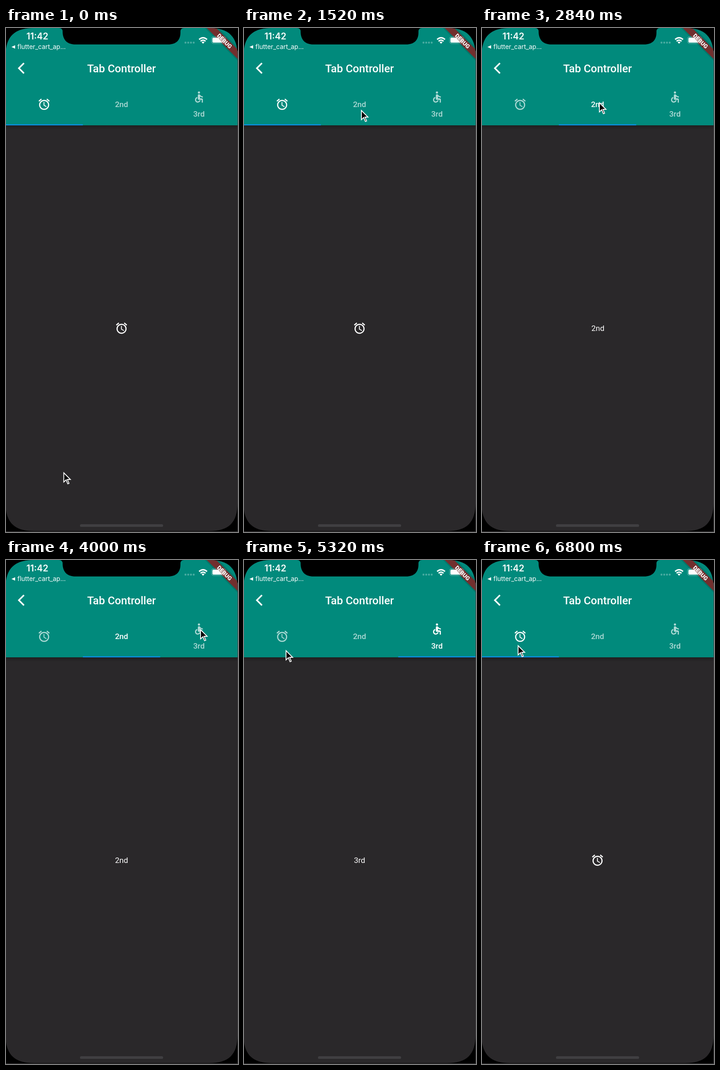
Write an HTML page that moves like this. It is 508x1103 px and loops after 6920 ms.

```html
<!DOCTYPE html>
<html lang="en">
<head>
<meta charset="utf-8">
<title>Tab Controller</title>
<style>
  html, body { margin: 0; width: 100%; height: 100%; overflow: hidden; background: #000; }
  svg { display: block; width: 100vw; height: 100vh; }
  text { fill: #fff; font-family: Roboto, sans-serif; }
  .mid { text-anchor: middle; }
  .label { font-size: 17px; }
  .tab { font-weight: 450; }
  .status { font-family: Inter, sans-serif; }
</style>
</head>
<body>
<svg viewBox="0 0 508 1103">
  <defs>
    <clipPath id="screen">
      <path d="M-1 62C-1 19 18 0 61 0H445C488 0 507 19 507 62V1039C507 1082 488 1101 445 1101H61C18 1101-1 1082-1 1039Z"/>
    </clipPath>
    <linearGradient id="shade" x2="0" y2="1">
      <stop offset="0" stop-color="#000" stop-opacity=".24"/>
      <stop offset="1" stop-color="#000" stop-opacity="0"/>
    </linearGradient>
    <g id="alarm" fill="#fff" transform="scale(1.227) translate(-12 -12)">
      <path d="M22 5.72l-4.6-3.86-1.29 1.53 4.6 3.86zM7.88 3.39L6.6 1.86 2 5.71l1.29 1.53zM12.5 8H11v6l4.75 2.85.75-1.23-4-2.37z"/>
      <circle cx="12" cy="13" r="8" fill="none" stroke="#fff" stroke-width="2"/>
    </g>
    <g id="chair" fill="#fff" transform="scale(1.227) translate(-12 -12)">
      <circle cx="12" cy="4" r="2"/>
      <path d="M19 13v-2c-1.54.02-3.09-.75-4.07-1.83l-1.29-1.43c-.5-.5-1.1-.77-1.83-.72C10.76 7.11 10 8.04 10 9.09V15c0 1.1.9 2 2 2h5v5h2v-5.5c0-1.1-.9-2-2-2h-3v-3.45c1.29 1.07 3.25 1.94 5 1.95zM12.83 18c-.41 1.16-1.52 2-2.83 2-1.66 0-3-1.34-3-3 0-1.31.84-2.41 2-2.83V12.1c-2.28.46-4 2.48-4 4.9 0 2.76 2.24 5 5 5 2.42 0 4.44-1.72 4.9-4z"/>
    </g>
  </defs>

  <rect width="508" height="1103"/>
  <g clip-path="url(#screen)">
    <rect x="-1" width="508" height="1101" fill="#2a282a"/>
    <g class="page"><use href="#alarm" x="253" y="657"/></g>
    <g class="page"><text class="mid label" x="253" y="663">2nd</text></g>
    <g class="page"><text class="mid label" x="253" y="663">3rd</text></g>

    <rect y="213" width="508" height="10" fill="url(#shade)"/>
    <rect x="-1" width="508" height="213" fill="#018a7c"/>
    <path transform="translate(26 73.3) scale(1.227)" fill="#fff" stroke="#fff" stroke-width=".4" d="M11.67 3.87L9.9 2.1 0 12l9.9 9.9 1.77-1.77L3.54 12z"/>
    <text class="mid" x="253" y="96.5" font-size="23.9" font-weight="500">Tab Controller</text>

    <g class="tabItem"><use href="#alarm" x="83.5" y="167"/></g>
    <g class="tabItem"><text class="mid label tab" x="253" y="172.7">2nd</text></g>
    <g class="tabItem">
      <use href="#chair" x="422.5" y="151"/>
      <text class="mid label tab" x="422.5" y="193.5">3rd</text>
    </g>
    <rect id="bar" y="210.7" width="169.3" height="2.4" fill="#0892e6"/>

    <path d="M116 0Q124 0 124 8V10C125 27 135 36 152 36H355C372 36 382 27 382 10V8Q382 0 390 0Z"/>
    <text class="status mid" x="68.7" y="25.2" font-size="19.5" font-weight="600">11:42</text>
    <path d="M12 41.5L20 37.7V45.3Z" fill="#fff"/>
    <text class="status" x="25" y="46" font-size="13.9">flutter_cart_ap...</text>
    <g fill="#fff" opacity=".28">
      <circle cx="393" cy="32" r="2.2"/><circle cx="399" cy="32" r="2.2"/>
      <circle cx="405" cy="32" r="2.2"/><circle cx="411" cy="32" r="2.2"/>
    </g>
    <g fill="none" stroke="#fff" stroke-width="3">
      <path d="M422.8 25.2Q431.5 17.2 440.2 25.2M426 29Q431.5 24 437 29"/>
      <path d="M428.3 31Q431.5 28.4 434.7 31L431.5 34.4Z" fill="#fff" stroke="none"/>
    </g>

    <g transform="translate(508 -1) rotate(45)">
      <rect x="-60" y="31" width="120" height="21" fill="#000" opacity=".14"/>
      <rect x="-60" y="34.4" width="120" height="14.7" fill="#722f2e"/>
    </g>
    <rect x="450" y="19" width="31" height="15" rx="4.5" fill="none" stroke="#fff" stroke-opacity=".45"/>
    <rect x="452" y="21" width="27" height="11" rx="2.8" fill="#fff"/>
    <text class="mid" transform="translate(508 -1) rotate(45)" y="46.2" font-size="12.5" font-weight="900" stroke="#722f2e" stroke-width="1.2" paint-order="stroke">DEBUG</text>

    <rect x="162" y="1086" width="182" height="5.8" rx="2.9" fill="#403f42"/>
  </g>
  <path d="M507.5 50V1102.5H0" fill="none" stroke="#444345"/>
  <path id="cursor" d="M1 2.4V21.5L5.8 17 9.3 25.4 11.9 24.3 8.5 16.2H14.8Z" stroke="#fff" stroke-width="1.7"/>
</svg>
<script>
const LOOP = 6920, STEP = 40, WIDTH = 508, TAB = WIDTH / 3;
const DURATION = 300, PAGE_LAG = 80;

// Tab changes: start time, tab left, tab entered
const changes = [[2475, 0, 1], [4080, 1, 2], [5520, 2, 0]];

// Pointer: time, x, y
const pointer = [
  [0, 125.5, 971], [120, 157, 937], [360, 157, 937], [460, 168, 780],
  [600, 125, 363], [720, 125, 363], [1440, 254, 171], [1480, 254, 171],
  [1520, 256, 178], [1640, 256, 178], [1760, 256, 161], [2960, 256, 161],
  [3680, 398, 158], [4000, 425, 150], [4400, 425, 150], [5120, 104, 192],
  [5320, 91, 196], [5480, 78, 185], [LOOP, 78, 185]
];

const pages = document.querySelectorAll('.page');
const tabs = document.querySelectorAll('.tabItem');
const bar = document.getElementById('bar');
const cursor = document.getElementById('cursor');

const clamp = v => Math.min(1, Math.max(0, v));
const mix = (a, b, k) => a + (b - a) * k;
const smooth = k => k * k * (3 - 2 * k);
const bezier = (a, b, s) => 3 * a * s * (1 - s) ** 2 + 3 * b * s * s * (1 - s) + s ** 3;

// cubic-bezier(.25, .1, .25, 1)
function ease(x) {
  x = clamp(x);
  if (x === 0 || x === 1) return x;
  let lo = 0, hi = 1;
  for (let i = 0; i < 24; i++) {
    const s = (lo + hi) / 2;
    if (bezier(.25, .25, s) < x) lo = s; else hi = s;
  }
  return bezier(.1, 1, lo);
}

function pointerAt(t) {
  const i = Math.max(1, pointer.findIndex(p => p[0] > t));
  const [t0, x0, y0] = pointer[i - 1], [t1, x1, y1] = pointer[i];
  const k = smooth(clamp((t - t0) / (t1 - t0)));
  return [mix(x0, x1, k), mix(y0, y1, k)];
}

function draw(t) {
  const [start, from, to] = changes.findLast(c => c[0] <= t) || changes[0];
  const barPos = ease((t - start) / DURATION);
  const pagePos = ease((t - start - PAGE_LAG) / DURATION);
  const dir = Math.sign(to - from);

  bar.setAttribute('x', -1 + TAB * mix(from, to, barPos));
  tabs.forEach((tab, i) => {
    const active = i === from ? 1 - barPos : i === to ? barPos : 0;
    tab.setAttribute('opacity', mix(.68, 1, active));
  });
  pages.forEach((page, i) => {
    const x = i === from ? -dir * pagePos : i === to ? dir * (1 - pagePos) : 2;
    page.setAttribute('transform', `translate(${x * WIDTH} 0)`);
  });
  cursor.setAttribute('transform', `translate(${pointerAt(t)}) scale(1.05)`);
}

const origin = performance.now();
function tick() {
  const t = (performance.now() - origin) % LOOP;
  draw(Math.floor(t / STEP) * STEP);
  requestAnimationFrame(tick);
}
tick();
</script>
</body>
</html>
```
